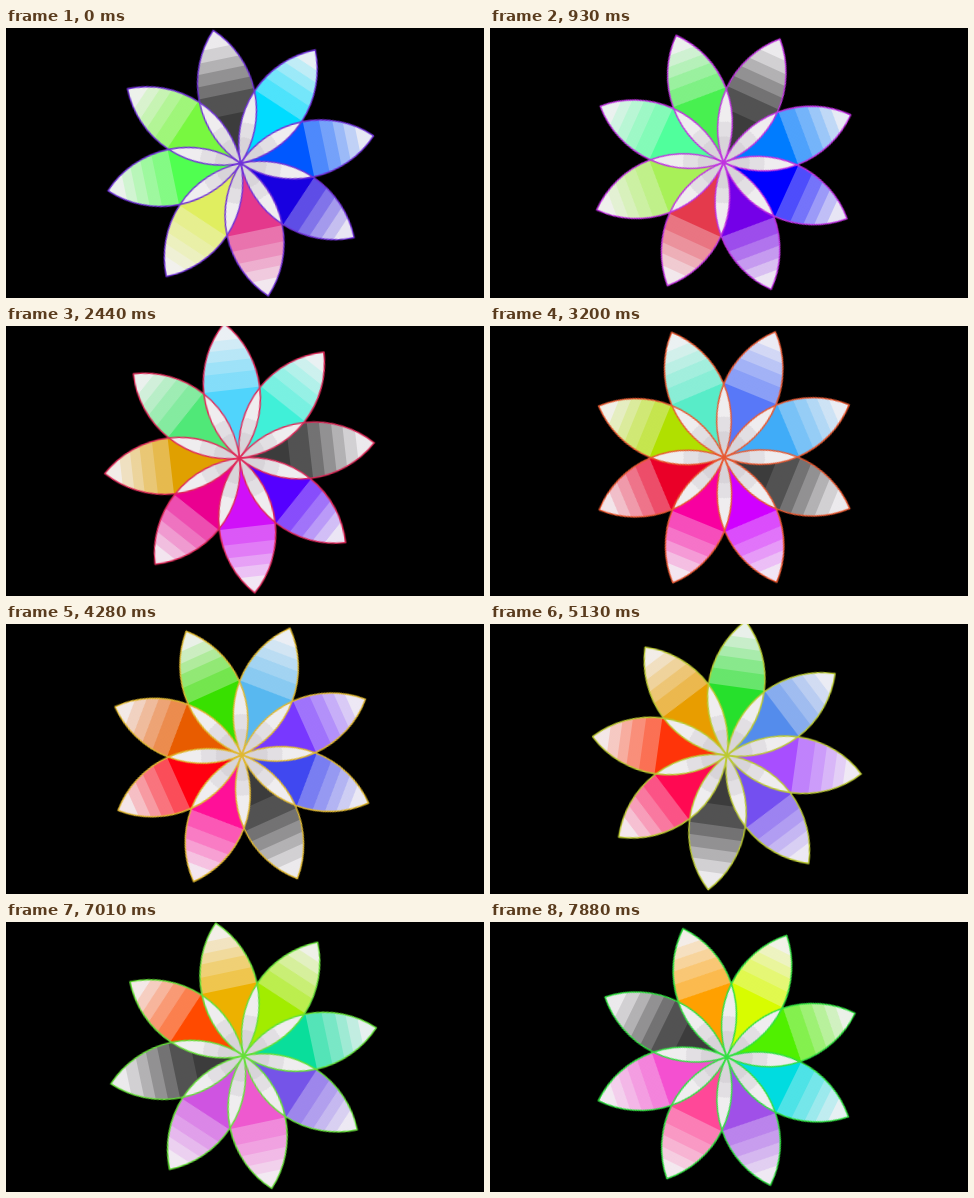
Animation of 478x270 px, one loop 8 s. Source, as an HTML page without scripts:

```html
<!DOCTYPE html>
<html lang="en">
<head>
<meta charset="utf-8">
<title>Colour flower</title>
<style>
html, body { margin: 0; width: 100%; height: 100%; overflow: hidden; background: #000; }
svg { display: block; width: 100vw; height: 100vh; }

.spin { animation: spin 8s infinite; }
.hue { animation: hue 8s infinite; }
.fills { fill: currentColor; }
.lines { fill: none; stroke: currentColor; stroke-width: 1.4; stroke-linejoin: round; }
.ring > use { transform: rotate(calc(var(--i) * 45deg)); }
linearGradient stop { stop-color: #f3f1f4; }

/* Gray petal's heading, advancing in even ticks between keys */
@keyframes spin {
  0% { transform: rotate(-11.7deg); animation-timing-function: steps(7); }
  11.6% { transform: rotate(24.5deg); animation-timing-function: steps(11); }
  30.45% { transform: rotate(83.5deg); animation-timing-function: steps(5); }
  39.95% { transform: rotate(112.2deg); animation-timing-function: steps(8); }
  53.45% { transform: rotate(155.8deg); animation-timing-function: steps(13); }
  75.6% { transform: rotate(225.4deg); animation-timing-function: steps(13); }
  98.45%, 100% { transform: rotate(296.2deg); }
}
@keyframes hue {
  0% { color: var(--a); animation-timing-function: steps(7); }
  11.6% { color: var(--b); animation-timing-function: steps(11); }
  30.45% { color: var(--c); animation-timing-function: steps(5); }
  39.95% { color: var(--d); animation-timing-function: steps(8); }
  53.45% { color: var(--e); animation-timing-function: steps(13); }
  75.6% { color: var(--f); animation-timing-function: steps(13); }
  98.45%, 100% { color: var(--g); }
}
</style>
</head>
<body>
<svg viewBox="0 0 478 270">
  <defs>
    <linearGradient id="fade" gradientUnits="userSpaceOnUse" x1="0" y1="0" x2="0" y2="-135.6">
      <stop offset=".51" stop-opacity="0"/>
      <stop offset=".51" stop-opacity=".32"/>
      <stop offset=".63" stop-opacity=".32"/>
      <stop offset=".63" stop-opacity=".48"/>
      <stop offset=".72" stop-opacity=".48"/>
      <stop offset=".72" stop-opacity=".64"/>
      <stop offset=".8" stop-opacity=".64"/>
      <stop offset=".8" stop-opacity=".79"/>
      <stop offset=".88" stop-opacity=".79"/>
      <stop offset=".88" stop-opacity=".95"/>
    </linearGradient>
    <linearGradient id="ashFade" gradientUnits="userSpaceOnUse" x1="0" y1="0" x2="0" y2="-135.6">
      <stop offset=".37" stop-opacity="0"/>
      <stop offset=".37" stop-opacity=".12"/>
      <stop offset=".52" stop-opacity=".12"/>
      <stop offset=".52" stop-opacity=".3"/>
      <stop offset=".61" stop-opacity=".3"/>
      <stop offset=".61" stop-opacity=".47"/>
      <stop offset=".7" stop-opacity=".47"/>
      <stop offset=".7" stop-opacity=".65"/>
      <stop offset=".78" stop-opacity=".65"/>
      <stop offset=".78" stop-opacity=".82"/>
      <stop offset=".87" stop-opacity=".82"/>
      <stop offset=".87" stop-opacity=".96"/>
    </linearGradient>
    <radialGradient id="core" gradientUnits="userSpaceOnUse" cx="0" cy="0" r="74">
      <stop offset=".35" stop-color="#d8d4d9"/>
      <stop offset=".35" stop-color="#e2dfe3"/>
      <stop offset=".55" stop-color="#e2dfe3"/>
      <stop offset=".55" stop-color="#efedef"/>
    </radialGradient>
    <path id="petal" d="M0 0A95.9 95.9 0 0 1 0-135.6A95.9 95.9 0 0 1 0 0Z"/>
    <g id="leaf">
      <use href="#petal"/>
      <use href="#petal" fill="url(#fade)"/>
    </g>
    <g id="ash">
      <use href="#petal" fill="#3c3c3c"/>
      <use href="#petal" fill="url(#ashFade)"/>
    </g>
    <path id="lens" fill="url(#core)" d="M0 0A95.9 95.9 0 0 1 0-73.4A95.9 95.9 0 0 1 0 0Z"/>
  </defs>
  <rect width="478" height="270"/>
  <g transform="translate(235.5 133.1)">
    <g class="spin">
      <g transform="translate(-1.13 1.89)">
        <g class="ring fills">
          <use href="#ash" style="--i:0"/>
          <use href="#leaf" class="hue" style="--i:1;--a:#00dcff;--b:#007cff;--c:#5500ff;--d:#d000ff;--e:#ff1098;--f:#ff0000;--g:#ffa000"/>
          <use href="#leaf" class="hue" style="--i:2;--a:#0058ff;--b:#0000ff;--c:#d010f8;--d:#f800a0;--e:#ff0010;--f:#ff7000;--g:#d8fc00"/>
          <use href="#leaf" class="hue" style="--i:3;--a:#1800e0;--b:#7400e8;--c:#ea0090;--d:#ea0028;--e:#e85c00;--f:#e8e800;--g:#50f000"/>
          <use href="#leaf" class="hue" style="--i:4;--a:#e4388c;--b:#e43a4c;--c:#e0a000;--d:#b0e000;--e:#38e000;--f:#10e060;--g:#00dce0"/>
          <use href="#leaf" class="hue" style="--i:5;--a:#e0ee60;--b:#a8f058;--c:#50e878;--d:#58ecc8;--e:#58b8f0;--f:#5058e8;--g:#a050e8"/>
          <use href="#leaf" class="hue" style="--i:6;--a:#50ff50;--b:#50ff9c;--c:#50d4fc;--d:#5878f8;--e:#7838ff;--f:#e068ff;--g:#ff4898"/>
          <use href="#leaf" class="hue" style="--i:7;--a:#78f840;--b:#48f050;--c:#40f0d8;--d:#40acf8;--e:#4048f0;--f:#b058f0;--g:#f450d0"/>
        </g>
        <g class="ring" transform="rotate(22.5)">
          <use href="#lens" style="--i:0"/>
          <use href="#lens" style="--i:1"/>
          <use href="#lens" style="--i:2"/>
          <use href="#lens" style="--i:3"/>
          <use href="#lens" style="--i:4"/>
          <use href="#lens" style="--i:5"/>
          <use href="#lens" style="--i:6"/>
          <use href="#lens" style="--i:7"/>
        </g>
        <g class="ring lines hue" style="--a:#7030d8;--b:#c030e0;--c:#e02858;--d:#e85830;--e:#e0b830;--f:#90e030;--g:#30e040">
          <use href="#petal" style="--i:0"/>
          <use href="#petal" style="--i:1"/>
          <use href="#petal" style="--i:2"/>
          <use href="#petal" style="--i:3"/>
          <use href="#petal" style="--i:4"/>
          <use href="#petal" style="--i:5"/>
          <use href="#petal" style="--i:6"/>
          <use href="#petal" style="--i:7"/>
        </g>
      </g>
    </g>
  </g>
</svg>
</body>
</html>
```
